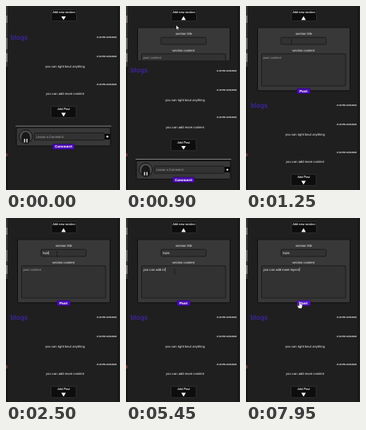
These frames come from a looping animation (143 px wide and 230 px high, 8000 ms). An HTML page:

```html
<!DOCTYPE html>
<html lang="en">
<head>
<meta charset="utf-8">
<title>Add a section</title>
<style>
html, body { margin: 0; width: 100%; height: 100%; overflow: hidden; background: #1f1f1f; }
svg { display: block; width: 100vw; height: 100vh; }
text {
  font-family: "Liberation Sans", Arial, sans-serif;
  font-size: 4.15px; fill: #f2f2f2; text-rendering: geometricPrecision; white-space: pre;
}
.mid { text-anchor: middle; }
.label { font-size: 3.85px; stroke: #f2f2f2; stroke-width: .08px; }
.date { font-size: 2.95px; font-weight: bold; text-anchor: end; }
.hint { fill: #a2a2a2; }
.action { font: bold 4.1px "DejaVu Sans", sans-serif; text-anchor: middle; }
.heading { font: 8px "DejaVu Sans", sans-serif; fill: #4a26d2; }
.key { fill: #0d0d0d; stroke: #404040; stroke-width: .6px; }
.card { fill: #383838; stroke: #0c0c0c; stroke-width: .9px; }
.field { fill: #323232; stroke: #141414; stroke-width: .7px; }
.purple { fill: #4a0bb4; stroke: #1a0738; stroke-width: .4px; }
.caret { fill: #fff; }
.cursor path { fill: #fff; stroke: #111; stroke-width: .4px; }
.cursor .beam { fill: none; stroke: #101010; stroke-width: .5px; }
</style>
</head>
<body>
<svg viewBox="0 0 143 230" preserveAspectRatio="none">
  <defs>
    <clipPath id="drawer"><rect id="opening" x="10" y="26.4" width="126" height="0"/></clipPath>
  </defs>

  <rect width="143" height="230" fill="#1f1f1f"/>
  <g id="edge">
    <rect width="2" height="230" fill="#151515"/>
    <rect width="2" height="76" fill="#383735"/>
    <rect y="12" width="2" height="9" fill="#77736c"/>
    <rect y="40" width="2" height="14" fill="#6a6761"/>
    <rect y="59" width="2" height="11" fill="#7d7870"/>
    <rect y="184" width="2" height="4" fill="#63302c"/>
    <rect x="140.5" width="1" height="230" fill="#151515"/>
  </g>

  <rect id="addKey" class="key" x="57" y="4.7" width="31.5" height="14" rx="1.5"/>
  <text class="label mid" x="72.5" y="9.4">Add new section</text>
  <path id="toggle" d="M-2.8-2.3H2.8L0 2.4Z" fill="#fff"/>

  <g clip-path="url(#drawer)">
    <rect class="card" x="14.5" y="26.9" width="116" height="79" rx="1.5"/>
    <text class="mid" x="72.5" y="35.5" font-size="4.3">section title</text>
    <rect class="field" x="44" y="39.2" width="56.5" height="8.8" rx="1"/>
    <text id="title" x="46" y="44.9"></text>
    <rect id="titleCaret" class="caret" y="41.4" width=".5" height="4.5"/>
    <text class="mid" x="72" y="56.6" font-size="4.3">section content</text>
    <rect class="field" x="19.5" y="59.8" width="105.5" height="40.2" rx="1"/>
    <text id="hint" class="hint" x="21.5" y="65.5">post content</text>
    <text id="body" x="21.5" y="65.7"></text>
    <rect id="bodyCaret" class="caret" y="62" width=".5" height="4.5"/>
    <rect id="postKey" class="purple" x="64" y="102.9" width="16.8" height="6.8" rx="1.4"/>
    <text class="action" x="72.1" y="107.9">Post</text>
  </g>

  <g id="feed">
    <text class="heading" x="5.7" y="41.9">blogs</text>
    <text class="date" x="138.7" y="40.2">2:18 PM 10/4/2020</text>
    <text class="date" x="138.7" y="64.3">2:18 PM 10/4/2020</text>
    <text class="mid" x="74" y="77.2">you can right bout anything</text>
    <text class="date" x="138.7" y="98.7">2:18 PM 10/4/2020</text>
    <text class="mid" x="74" y="111.4">you can add more content</text>
    <rect class="key" x="56.5" y="125.4" width="31.5" height="14" rx="1.5"/>
    <text class="label mid" x="72.3" y="130.4">Add Post</text>
    <path d="M69.4 133.6H75L72.2 138.2Z" fill="#fff"/>
    <rect x="12" y="149.7" width="120" height=".9" fill="#858585"/>
    <rect class="card" x="13" y="152" width="118" height="23" rx="1.5"/>
    <circle cx="24.8" cy="163.3" r="8.4" fill="#4c4c4c" stroke="#0b0b0b" stroke-width=".9"/>
    <path d="M19.2 168.6Q18.8 157.5 24.8 157.5T30.4 168.6Q24.8 173.6 19.2 168.6Z" fill="#181818"/>
    <path d="M23.3 166V170.4M26.3 166V170.4" stroke="#dedede" stroke-width="1.4"/>
    <rect class="field" x="35.5" y="158.7" width="88" height="9" rx="1"/>
    <text class="hint" x="38" y="164.8" font-size="4">Leave a Comment</text>
    <rect x="124" y="159.7" width="6.5" height="7" rx=".8" fill="#050505"/>
    <circle cx="127.2" cy="163.2" r="1.2" fill="#fff"/>
    <rect class="purple" x="58.4" y="172.5" width="27.6" height="6.8" rx="1.4"/>
    <text class="action" x="72.2" y="177.4">Comment</text>
  </g>

  <g id="cursor" class="cursor">
    <path id="arrow" d="M0 0V5.6L1.3 4.4 2.2 6.4 3.1 6 2.2 4.1H4Z"/>
    <path id="hand" d="M-.7 .6Q0-.5 .7 .6V3Q1.4 2.5 2 3.2 2.8 2.8 3.3 3.7V6L2.5 8.6H-1.2L-3 5.4Q-2.6 4.3-.7 5.4Z"/>
    <path id="beam" class="beam" d="M-1-2.8H1M0-2.8V2.8M-1 2.8H1"/>
  </g>
</svg>
<script>
const LOOP = 8000, STEP = 50, DRAWER = 85;
const el = {};
document.querySelectorAll("[id]").forEach(n => el[n.id] = n);

const clamp = v => Math.min(1, Math.max(0, v));
const swing = p => .5 - Math.cos(Math.PI * clamp(p)) / 2;
const show = (node, on) => node.setAttribute("visibility", on ? "inherit" : "hidden");

// time, x, y of the pointer's hot spot
const path = [
  [0, 88, 233], [500, 71, 18], [800, 71, 18], [900, 63, 24], [1150, 56, 43],
  [1250, 57, 45], [1300, 61, 45], [1550, 61, 45], [1650, 64, 45], [3050, 64, 45],
  [3400, 62, 66], [3600, 61, 67], [7350, 61, 67], [7850, 67.3, 104.5], [8000, 67.3, 104.5]
];

// each time adds the next character
const inputs = [
  { text: el.title, caret: el.titleCaret, x: 46, value: "topic", focus: 1450, blur: 3500,
    keys: [1950, 2200, 2300, 2500, 2650] },
  { text: el.body, caret: el.bodyCaret, x: 21.5, value: "you can add more topics", focus: 3500, blur: LOOP,
    keys: [3950, 4050, 4150, 4250, 4450, 4550, 4650, 4700, 4850, 5050, 5100, 5250,
           5400, 5500, 5600, 5700, 5800, 5950, 6050, 6200, 6450, 6700, 6950] }
];

function pointAt(t) {
  const i = Math.max(1, path.findIndex(p => p[0] > t));
  const [t0, x0, y0] = path[i - 1], [t1, x1, y1] = path[i];
  const k = swing((t - t0) / (t1 - t0));
  return [x0 + (x1 - x0) * k, y0 + (y1 - y0) * k];
}

function drawInput({ text, caret, x, value, focus, blur, keys }, t) {
  const n = keys.filter(k => k <= t).length;
  const typed = value.slice(0, n);
  if (text.textContent !== typed) text.textContent = typed;
  const width = n ? text.getSubStringLength(0, n) : 0;
  const since = t - (n ? keys[n - 1] : focus);
  caret.setAttribute("x", x + width + .2);
  show(caret, t >= focus && t < blur && since % 1000 < 500);
  return n;
}

function drawCursor(t) {
  const [x, y] = pointAt(t);
  const inside = (l, top, r, b) => x > l && x < r && y > top && y < b;
  const onAdd = inside(57, 4.7, 88.5, 18.7);
  const onPost = t > 1250 && inside(64, 102.9, 80.8, 109.7);
  const onText = t > 1100 && (inside(44, 39.2, 100.5, 48) || inside(19.5, 59.8, 125, 100));
  el.cursor.setAttribute("transform", `translate(${x} ${y})`);
  show(el.hand, onAdd || onPost);
  show(el.beam, onText);
  show(el.arrow, !onAdd && !onPost && !onText);
  el.addKey.style.fill = onAdd ? "#343434" : "";
  el.postKey.style.fill = onPost ? "#5616c8" : "";
}

function draw(t) {
  const open = DRAWER * swing((t - 605) / 600);
  el.opening.setAttribute("height", open);
  el.feed.setAttribute("transform", `translate(0 ${open})`);
  const flip = 1 - 2 * clamp((t - 605) / 290);
  el.toggle.setAttribute("transform", `translate(72.2 15.2) scale(1 ${flip})`);
  const typed = inputs.map(i => drawInput(i, t));
  show(el.hint, !typed[1]);
  drawCursor(t);
}

const start = performance.now();
function tick() {
  const t = Math.max(0, performance.now() - start) % LOOP;
  draw(Math.floor(t / STEP) * STEP);
  requestAnimationFrame(tick);
}
tick();
</script>
</body>
</html>
```
